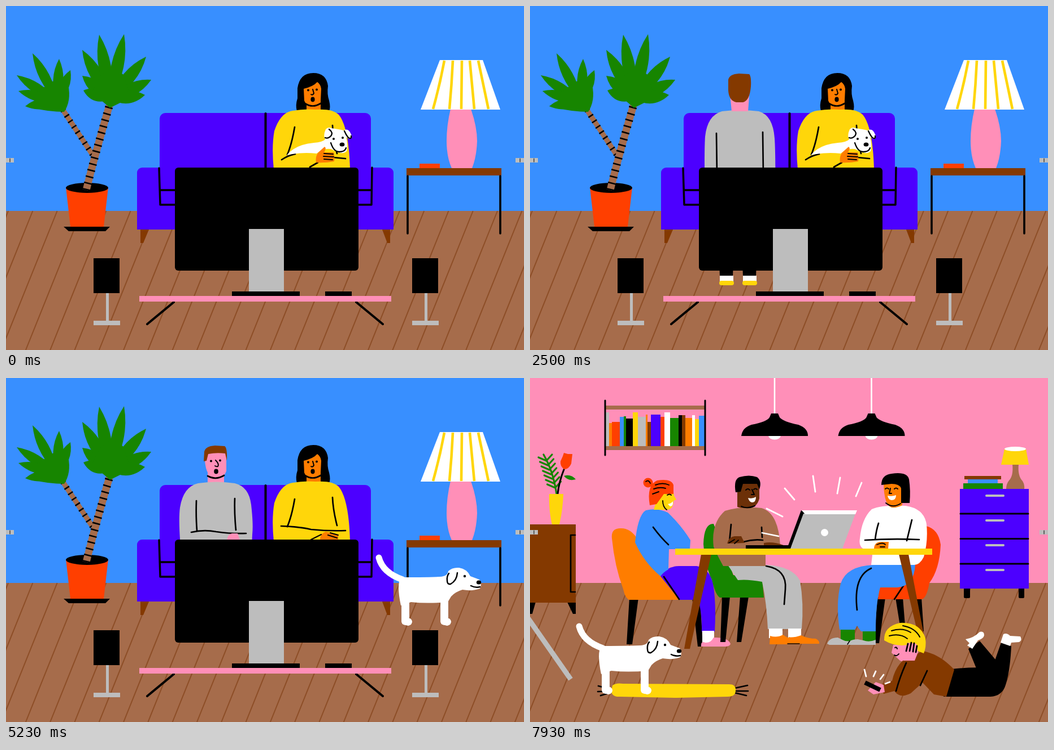
An HTML page for the animation above (8 s loop, 917 px wide and 611 px high).

```html
<!DOCTYPE html>
<html lang="en">
<head>
<meta charset="utf-8">
<title>Two rooms</title>
<style>
html, body { margin: 0; width: 100%; height: 100%; overflow: hidden; }
svg { display: block; width: 100vw; height: 100vh; }
.l { fill: none; stroke: #000; stroke-linecap: round; stroke-linejoin: round; }
.w { fill: none; stroke: #fff; stroke-width: 2.8; stroke-linecap: round; }
.hide { display: none; }
</style>
</head>
<body>
<svg id="stage" viewBox="0 0 917 611" preserveAspectRatio="none"></svg>
<script>
const C = { blue: '#388fff', pink: '#ff8fb8', wood: '#a66c4b', seam: '#8d4e27', brown: '#843900',
  violet: '#4c00ff', gray: '#bdbdbd', red: '#ff3f00', orange: '#ff7d00', yellow: '#ffd60a',
  green: '#178500', dark: '#6c3008', k: '#000', white: '#fff' };

const p = (color, d) => `<path d="${d}" fill="${C[color]}"/>`;
const r = (color, x, y, x2, y2, rad = 0) =>
  `<rect x="${x}" y="${y}" width="${x2 - x}" height="${y2 - y}" rx="${rad}" fill="${C[color]}"/>`;
const o = (color, x, y, rx, ry = rx) => `<ellipse cx="${x}" cy="${y}" rx="${rx}" ry="${ry}" fill="${C[color]}"/>`;
const l = (d, w = 2.7) => `<path class="l" d="${d}" stroke-width="${w}"/>`;
const w = d => `<path class="w" d="${d}"/>`;
const s = (color, d, width, cap = 'butt', dash = '') =>
  `<path d="${d}" fill="none" stroke="${C[color]}" stroke-width="${width}" stroke-linecap="${cap}" stroke-linejoin="round" stroke-dasharray="${dash}"/>`;
const g = (id, ...kids) => `<g id="${id}">${kids.join('')}</g>`;
const at = (x, y, kids) => `<g transform="translate(${x} ${y})">${kids}</g>`;

// a pointed leaf between two points
function leaf(x, y, tx, ty, half) {
  const dx = tx - x, dy = ty - y, n = Math.hypot(dx, dy);
  const mx = x + dx * .52, my = y + dy * .52, ox = -dy / n * half, oy = dx / n * half;
  return p('green', `M${x} ${y}Q${mx + ox} ${my + oy} ${tx} ${ty}Q${mx - ox} ${my - oy} ${x} ${y}Z`);
}
const crown = (x, y, half, tips) => tips.map(t => leaf(x, y, ...t, half)).join('');

function floor() {
  let d = '';
  for (let x = 4; x < 1060; x += 43.3) d += `M${x} 364L${x - 99} 611`;
  return r('wood', 0, 364, 917, 611) + s('seam', d, 2);
}

// ---------- living room ----------
const trunk = (d, width) => s('wood', d, width) + s('k', d, width + 1, 'butt', '2.6 9');
const plant =
  p('red', 'M106 322H181L173 392H114Z') + o('k', 143.5, 323, 37.5, 9) + p('k', 'M102 392H184L176 400H111Z') +
  trunk('M153 264L101 185', 9) + trunk('M142 327Q158 262 183 177', 13) +
  crown(185, 166, 22, [[135, 124], [135, 78], [165, 51], [209, 50], [248, 90], [257, 131], [246, 158], [137, 150]]) +
  p('green', 'M152 153L168 122L188 108L208 122L217 150L206 170L184 181Z') +
  crown(91, 170, 18, [[19, 123], [47, 84], [94, 94], [114, 114], [22, 151], [34, 178]]) +
  p('green', 'M60 150L78 136L96 128L110 140Q116 168 103 188Q75 188 48 181Z');

const sofa =
  r('violet', 272, 190, 646, 390, 10) + r('violet', 232, 287, 686, 380, 9) + r('violet', 232, 320, 686, 397) +
  l('M459.5 191V300', 4) +
  l('M271 288L273 353H300M273 327H300M648 287L647 353H622M647 327H622', 3.5) +
  p('brown', 'M238 397H253L243 421H238ZM666 397H680V421H675Z');

const sideTable =
  p('pink', 'M787 183H823Q834 215 834 240Q833 268 825 288H789Q780 268 780 240Q780 212 787 183Z') +
  p('white', 'M768 96H844L875 184H734Z') +
  s('yellow', 'M776 97Q768 140 756 183M791 97Q789 140 785 183M807 97L806 183M821 97Q825 140 829 183M836 97Q845 140 854 183', 4.6) +
  r('red', 732, 280, 768, 288) + r('brown', 709, 288, 877, 301) + l('M711 302V404M875 302V404', 3.6);

const womanHead =
  p('k', 'M515 187Q512 176 516 164V146Q520 119 544 119Q567 119 570 142Q568 156 572 168Q575 180 572 187Z') +
  r('orange', 532, 168, 557, 190) +
  p('orange', 'M527 147Q544 143 551 135Q557 139 558 147L557 168Q554 178 543 179Q531 178 528 168Z') +
  l('M529 173Q543 182 557 173') + o('k', 535, 149.5, 2) + o('k', 550, 148.5, 2) +
  l('M543 148L545 155Q543 159 540 157', 2) + o('k', 543, 166, 3.6, 4.4);
const woman = womanHead +
  p('yellow', 'M503 187Q525 182 548 184Q578 182 589 193Q607 215 609 290H474Q470 250 475 222Q485 192 503 187Z') +
  l('M511 215Q506 245 498 264M578 212Q579 235 586 262');

const lapDog =
  l('M488 273Q500 265 512 263M538 286L552 278M580 269L601 271') +
  p('white', 'M497 265Q512 246 545 243Q560 242 565 237Q561 230 566 219Q570 214 576 217Q590 219 598 221Q606 216 611 228Q614 236 607 236L602 233Q606 246 603 258Q598 263 588 260L575 254Q562 252 550 262Q522 259 497 265Z') +
  l('M572 219Q580 225 575 231Q570 236 565 234M599 222Q602 229 606 234Q612 237 611 231M575 243Q580 259 590 259Q600 259 602 252', 2.3) +
  o('k', 580, 236, 2) + o('k', 596, 234, 2) + o('k', 595, 246, 4.4, 3.6) +
  p('orange', 'M549 278Q547 266 554 259L564 250Q568 252 563 260L580 260Q582 268 581 276Q565 279 549 278Z') +
  l('M563 262L579 263M562 267L580 268M563 272L578 273', 2);
const crossedArms =
  l('M487 263Q518 264 540 269Q570 272 601 271') +
  p('orange', 'M556 288Q556 276 566 273L588 278V288Z') +
  l('M540 287L558 278M570 279L586 284M574 275L588 279', 2.2);

const shoe = (x, y) => at(x, y, p('yellow', 'M0 0Q28 -3 28 9Q27 14 14 14H-2Z'));
const profile =
  p('pink', 'M182 140L213 137L214 152L218 159Q217 162 213 162Q215 177 205 181V188H179Z') +
  p('brown', 'M177 162Q174 133 181 127Q197 121 212 127Q216 132 213 139L189 140L187 161Z') +
  o('k', 208, 146, 1.9) + l('M192 163Q194 175 203 181M206 169Q210 171 213 168', 2.3);
const walkTop =
  p('gray', 'M178 187Q200 182 209 189Q222 240 219 296H165Q159 230 168 200Q171 190 178 187Z') +
  p('gray', 'M173 280H209L204 333L179 329Z') +
  p('pink', 'M183 330L204 331Q206 350 203 356Q195 360 188 357Z') +
  l('M191 339L193 353M197 338L198 353M170 222L173 294M207 210Q206 250 209 272', 2.2);
const backBody = 'M340 187Q372 183 405 187Q430 194 433 235Q435 265 434 340H310Q308 265 310 232Q314 194 340 187Z';
const frontHead =
  r('pink', 357, 165, 386, 190) + p('pink', 'M352 132H390L390 165Q386 178 372 178Q354 177 352 146Z') +
  p('brown', 'M350 148L351 131Q353 121 370 120L387 121Q392 124 391 147L388 134Q372 132 358 135L355 147Z') +
  l('M357 174Q371 182 386 173') + o('k', 363, 147.5, 2) + o('k', 379, 146.5, 2) +
  l('M371 146Q378 153 375 157Q373 158 370 156', 2);
const foot = x => at(x, 0, p('k', 'M0 430H27L25 480H2Z') + r('white', 2, 479, 26, 490) + r('yellow', 1, 488, 27, 496, 4));

const man = g('man',
  g('walkLegs', p('k', 'M166 294H217Q215 380 209 446L202 482H170Q171 380 166 330Z'), shoe(170, 482), shoe(200, 482)),
  g('strideLegs', s('k', 'M188 300L174 380L164 478M192 300L212 390L226 478', 30), p('k', 'M166 294H217L222 370H170Z'), shoe(152, 480), shoe(224, 482)),
  g('side', walkTop, profile),
  g('back', p('gray', backBody), l('M330 226L331 300M412 224L413 300'),
    g('nape', p('pink', 'M353 146H389L386 187H357Z'),
      p('brown', 'M351 150V131Q353 121 370 120L388 121Q392 125 391 143Q389 168 377 171H365Q352 168 351 150Z')),
    g('turn', at(178, -4, profile))),
  g('front', frontHead, p('gray', 'M340 187Q372 182 405 187Q430 193 434 225Q438 260 436 278L433 340H313Q304 260 308 230Q314 193 340 187Z'),
    l('M337 218Q336 245 338 271M405 214Q404 240 407 270'),
    g('folded', l('M328 274Q350 269 372 273Q400 277 425 276'), p('pink', 'M391 288Q393 277 400 276H410L414 288Z')),
    g('smile', l('M366 165Q372 169 378 164', 2.2)), g('gasp', o('k', 372, 166, 3.8, 4.4))));

const tv =
  r('k', 299, 287, 624, 470, 6) + l('M297 526L250 565M620 526L667 565', 4) + r('gray', 430, 396, 492, 508) +
  r('k', 400, 507, 520, 517) + r('k', 565, 507, 612, 517) + r('pink', 236, 515, 682, 525);
const speaker = x => at(x, 0, r('gray', 22, 509, 27, 561) + r('gray', 0, 559, 47, 567) + r('k', 0, 448, 46, 510));

const room1 = g('room1', r('blue', 0, 0, 917, 364), floor(), plant, sofa, sideTable, woman,
  g('crossed', crossedArms), g('lapDog', lapDog), g('feet', foot(334), foot(375)), man,
  g('dogA'), tv, speaker(155), speaker(719));

// ---------- dining room ----------
const bookList = [[6, 61, 'gray'], [5, 42, 'orange'], [14, 44, 'red'], [7, 53, 'blue'], [4, 54, 'green'], [12, 50, 'k'],
  [9, 61, 'yellow'], [14, 53, 'gray'], [3, 57, 'orange'], [6, 44, 'brown'], [17, 57, 'violet'], [7, 53, 'red'],
  [10, 61, 'white'], [15, 51, 'green'], [6, 56, 'k'], [6, 56, 'brown'], [12, 51, 'orange'], [5, 56, 'white'],
  [7, 49, 'yellow'], [10, 55, 'blue']];
let bx = 134;
const shelf = bookList.map(([n, h, c]) => r(c, bx, 122 - h, bx += n, 122)).join('') +
  r('wood', 133, 49, 310, 56) + r('wood', 133, 121, 310, 128) + l('M133 40V137M310 40V137', 3);

const pendant = x => at(x, 0, s('white', 'M0 0V66', 2.6) + o('white', 0, 102, 11, 7.5) +
  p('k', 'M-9 70L-6 63H6L9 70Q16 78 42 83Q59 89 59 103H-59Q-57 88 -41 83Q-14 78 -9 70Z'));

let fern = 'M47 206Q41 165 24 136';
for (let i = 0; i < 7; i++) {
  const x = 29 + i * 2.6, y = 147 + i * 8;
  fern += `M${x} ${y}l-14 -6M${x} ${y}l10 -11`;
}
const cabinet =
  s('gray', 'M-4 426L72 535', 9) + p('k', 'M66 398H81V419H76ZM0 398H10L4 419H0Z') + r('brown', 0, 260, 81, 399) +
  l('M80 279H72V380H80') + s('green', fern, 3.2, 'round') + l('M49 206Q51 185 61 160', 3) +
  p('red', 'M58 139L60 133L67 135L75 135L73 152Q69 162 60 162Q53 156 54 148Z') +
  p('green', 'M60 174Q72 170 81 180Q68 184 60 174Z') +
  p('yellow', 'M34 206H59Q58 235 52 260H39Q33 235 34 206Z');

const drawers =
  r('k', 768, 372, 779, 391, 2) + r('k', 865, 372, 875, 391, 2) + r('violet', 761, 197, 883, 374) +
  l('M762 241H882M762 285.5H882M762 330H882', 3) +
  [209, 253, 297, 341].map(y => s('gray', `M808 ${y}H838`, 4, 'round')).join('') +
  r('brown', 769, 174, 834, 180) + r('blue', 775, 180, 828, 188) + r('green', 767, 187, 837, 197) +
  p('wood', 'M854 153H865Q863 174 872 183Q876 190 875 197H843Q843 188 848 182Q856 174 854 153Z') +
  p('yellow', 'M840 126H878L883 154H834Z') + o('white', 859, 126, 19, 4);

const guest1 =
  p('k', 'M176 390H192L181 473H171ZM287 390H301L306 477H297Z') +
  p('orange', 'M145 285Q143 267 160 267Q178 266 190 286L240 348L264 385L290 380V394H175Q168 390 165 375Q150 335 145 285Z') +
  p('violet', 'M231 352Q242 334 264 334H295Q318 338 324 365Q330 400 327 451H304Q305 420 298 394H265Z') +
  l('M237 353L264 393') + r('white', 305, 449, 326, 470) +
  p('pink', 'M303 477Q302 466 310 470Q320 471 325 461Q350 460 355 472Q354 477 345 477Z') +
  p('blue', 'M205 235Q225 230 244 239Q268 262 284 288L283 304H246L245 340Q236 345 231 352Q202 328 186 292Q191 243 205 235Z') +
  l('M218 265Q232 284 245 296') +
  g('head1', p('yellow', 'M230 196L254 202L255 209L259 216L254 218Q254 233 243 234H219Z'), o('red', 209, 186, 8.5),
    p('red', 'M212 226Q206 190 225 182Q250 178 254 190V206H237L224 224Z'),
    l('M205 184Q210 180 213 187M222 190Q235 185 246 190M219 197Q230 193 240 196M217 206L228 202M235 218Q235 229 242 234M243 208Q247 205 250 208', 1.9),
    p('white', 'M244 224Q250 223 253 219Q254 228 248 228Z'));

const guest2 =
  p('k', 'M340 388H354L346 469H337ZM372 388H387L374 469H366Z') +
  p('green', 'M325 259Q308 258 307 295Q310 335 322 358Q328 385 336 390H414L411 358L360 350Z') +
  p('gray', 'M350 332H420Q465 335 478 360Q485 400 481 446H421Q419 400 411 362Q385 357 368 359Z') +
  l('M418 334Q455 340 452 375L450 402') + r('white', 423, 445, 447, 462) + r('white', 457, 445, 480, 462) +
  p('orange', 'M456 472L458 460Q466 462 480 457Q492 463 506 463Q513 467 512 472Z') +
  p('orange', 'M424 473L425 458Q437 462 448 456Q458 464 471 464Q478 468 477 473Z') + l('M456 472H477', 1.5) +
  p('wood', 'M345 236Q375 227 410 231Q440 240 443 298L417 302V334H342Q333 318 325 300Q320 258 345 236Z') +
  l('M356 260L353 291M410 265L411 283M378 291Q395 286 412 288') +
  p('dark', 'M349 294Q352 282 362 281H374L380 293ZM414 299V293Q430 290 449 297V300Z') + l('M362 287L352 293M369 288L362 294', 1.8) +
  g('head2', p('dark', 'M367 188H406V214Q402 229 390 231Q374 232 367 229Z'),
    p('k', 'M364 203Q360 180 371 176Q388 171 402 176Q411 183 406 198L402 188H377L373 202Z'),
    l('M382 199Q386 195 389 199M396 198Q399 195 402 198M393 198L397 207L392 207M374 228Q385 233 398 227', 2),
    p('white', 'M386 213Q394 215 400 211Q400 221 393 221Q388 220 386 213Z'));

const guest3 =
  p('k', 'M615 390H629L618 471H609ZM647 390H660L664 440H655ZM682 390H693L697 450H688Z') +
  p('red', 'M701 263Q723 268 727 296Q725 340 707 364Q702 392 693 393H616L620 365L680 330Z') + l('M661 369L645 393') +
  r('green', 550, 445, 575, 468) + r('green', 589, 448, 612, 468) +
  p('gray', 'M562 474Q564 464 580 464L590 466Q600 470 612 465V474ZM526 472Q530 461 545 461L553 465Q562 470 577 465L576 474H530Z') + l('M562 473L566 467', 1.5) +
  p('blue', 'M608 332Q560 334 550 365Q541 400 548 447H575L579 440L586 450H612Q612 400 620 372H650Q680 370 682 331Z') +
  l('M604 338Q572 352 579 412') +
  p('white', 'M605 233Q625 225 665 227Q698 232 702 260Q705 290 697 318Q690 332 680 332H604L607 306Q580 308 584 285Q587 250 605 233Z') +
  l('M617 258Q613 270 611 287M676 252L667 289M593 288Q640 285 689 287') +
  p('orange', 'M609 304Q609 292 620 291H635L634 304Z') + l('M614 296Q625 291 629 296M620 300H628', 1.8) +
  g('head3', p('orange', 'M626 188H660L659 226Q650 231 640 230Q627 226 626 188Z'),
    p('k', 'M622 190Q622 172 640 170Q668 166 671 180Q674 200 672 222H657V196Q654 188 640 188Z'),
    l('M629 197Q632 194 635 197M645 197Q648 194 651 197M638 196L636 205H640M630 222Q642 232 656 223', 2),
    p('white', 'M633 209Q641 211 648 208Q648 217 640 217Q634 216 633 209Z'));

const laptop = r('k', 382, 297, 462, 303) + p('k', 'M480 235L488 240L464 303H455Z') +
  p('gray', 'M484 241H576L553 303H461Z') + p('white', 'M481 235H579L576 242H487Z') + o('white', 521.5, 274.5, 6.5) +
  g('raysA', w('M451 196L468 216M501 174L505 202M549 177L544 205M587 186L577 210M419 232L447 246M411 275L440 281'));

const table = p('brown', 'M303 313H321L283 481H273ZM653 313H670L698 460H688Z') + r('yellow', 257, 303, 712, 314);

const kid =
  g('kick', p('k', 'M776 481L796 467L834 512L826 552L800 540Z'),
    p('white', 'M771 464Q785 462 796 451Q804 449 804 457Q803 463 793 466L783 481L774 475L778 471Z')) +
  p('k', 'M746 517Q790 512 818 516L834 470L852 476Q850 520 842 545Q836 565 815 566H732Z') +
  l('M788 478L822 516', 1) +
  p('white', 'M833 470L838 455Q844 452 850 458L868 459Q872 466 866 469L852 470L850 476Z') +
  p('pink', 'M643 474L684 468V502Q664 506 655 502L640 488Z') +
  p('brown', 'M695 485Q725 490 751 518L737 566L715 562L695 541L674 560Q655 570 645 556L626 561L620 545L641 538Q646 515 660 502Z') +
  l('M703 520L691 546M666 506Q655 530 648 556') +
  p('yellow', 'M627 466Q626 441 655 435Q690 433 700 462Q702 478 697 489L684 484L678 472Q650 480 627 466Z') +
  l('M640 449Q660 443 674 452M636 458Q655 453 668 463M660 440Q682 444 690 460M646 479Q649 477 650 481M645 492Q649 495 653 490', 2) +
  p('pink', 'M661 502Q663 482 668 470L684 472L687 487L681 502Z') +
  l('M666 485L669 472M672 485L675 470M678 486L680 471M683 487L685 476', 2.8) +
  p('pink', 'M598 555L612 540L626 545L628 558L608 562Z') + s('k', 'M593 541L620 554', 8) +
  g('raysB', w('M592 518L595 530M612 521L608 530M626 527L620 535M637 540L629 543'));

const rug = l('M121 547L144 553M120 557L144 556M125 564L145 558M362 551L385 546M362 556H386M362 559L383 564') +
  p('yellow', 'M146 546Q152 541 165 543L350 544Q365 543 364 555Q364 566 350 566L260 568L160 566Q144 567 144 555Z');

const room2 = g('room2', r('pink', 0, 0, 917, 364), floor(), shelf, pendant(433), pendant(604.5), cabinet, drawers,
  guest1, guest2, guest3, laptop, table, kid, rug, g('dogB'));

const handles = r('gray', 0, 270, 14, 278) + r('gray', 902, 270, 917, 278) + l('M7 271V277M910 271V277', 1);

document.getElementById('stage').innerHTML = room1 + room2 + handles + g('door');

// ---------- motion ----------
const $ = id => document.getElementById(id);
const show = (id, on) => $(id).classList.toggle('hide', !on);
const move = (id, x, y, extra = '') => $(id).setAttribute('transform', `translate(${x} ${y}) ${extra}`);
const step = (rows, t) => rows.filter(row => row[0] <= t).pop();
function ease(rows, t) {
  const i = rows.findIndex(row => row[0] > t);
  if (i < 0) return rows[rows.length - 1].slice(1);
  const a = rows[Math.max(0, i - 1)], b = rows[i], k = i ? (t - a[0]) / (b[0] - a[0]) : 0;
  return a.slice(1).map((v, n) => v + (b[n + 1] - v) * k);
}

const doorSteps = [[0, 0], [170, 80], [270, 170], [1100, 130], [1200, 77], [1300, 0]];
const manSteps = [[0, 'none', 0, 0], [900, 'stride', -56, 0], [1100, 'stride', -26, 0], [1200, 'walk', 0, 0],
  [1300, 'stride', 36, 0], [1500, 'walk', 62, 0], [1600, 'stride', 84, 0], [1700, 'walk', 106, 0],
  [1900, 'stride', 134, 0], [2100, 'walk', 156, 0], [2200, 'stride', 170, 0], [2300, 'walk', 179, 0],
  [2500, 'back', 0, 0], [2700, 'back', 0, -10], [2900, 'back', 0, -21], [3100, 'back', 0, -35], [3300, 'back', 0, -44],
  [3500, 'turn', 0, -44], [3600, 'stand', 0, -44], [3900, 'sit', 0, -18], [3930, 'sit', 0, 0], [4370, 'gasp', 0, 0]];
const dogPath = [[5030, -150, -130], [5130, -70, -75], [5230, 0, 0], [5330, 0, 0], [6230, 57, 94], [6630, 104, 126],
  [7030, 174, 122], [7830, 344, 122]];
const CUT = 6830;

// foot shifts: rear near, rear far, front near, front far
const gaits = [[0, -30, -10, 30], [8, -14, 4, 8], [-30, 0, 26, -14], [-12, 8, 8, 4]];
function dog(f) {
  const leg = (x, dx) => {
    const end = 432 - Math.abs(dx) * .24;
    return s('white', `M${x} 385L${x + dx * .45} ${(385 + end) / 2}L${x + dx} ${end}l5 1`, 13.5, 'round');
  };
  return s('white', 'M660 319Q667 346 702 358', 11, 'round') +
    leg(707, f[1]) + leg(776, f[3]) + leg(707, f[0]) + leg(776, f[2]) +
    p('white', 'M692 354Q740 354 768 353Q782 352 783 343Q790 336 802 337Q816 339 822 352L838 358Q843 366 839 374Q826 379 808 376Q795 380 788 388L782 398Q745 401 717 398L699 404Q693 375 696 362Z') +
    (f[1] ? l('M692 371Q692 390 695 406M763 395Q768 397 772 404', 2) : '') +
    l('M799 346Q798 360 787 366Q781 367 781 360Q780 352 784 347M823 369Q831 373 839 371', 2.5) +
    o('k', 812, 352, 2.2) + o('k', 837, 363, 4.2, 3.6);
}

function draw(t) {
  const second = t >= CUT;
  show('room1', !second);
  show('room2', second);

  const open = step(doorSteps, t)[1], k = open - 77, hx = open - 11;
  $('door').innerHTML = open && !second ? p('brown', `M0 95L${open} ${110 - k * .12}V${482 + k * .25}L0 516Z`) +
    r('gray', hx - 3, 256, hx + 4, 310, 3) + r('gray', hx - 16, 270, hx + 4, 277) + l(`M${hx - 9} 271V276`, 1) : '';

  const [, pose, mx, my] = step(manSteps, t);
  const side = pose === 'walk' || pose === 'stride', back = pose === 'back' || pose === 'turn';
  show('walkLegs', pose === 'walk');
  show('strideLegs', pose === 'stride');
  show('side', side);
  show('back', back);
  show('nape', pose === 'back');
  show('turn', pose === 'turn');
  show('front', !side && !back && pose !== 'none');
  show('folded', pose === 'sit' || pose === 'gasp');
  show('smile', pose !== 'gasp');
  show('gasp', pose === 'gasp');
  move('man', mx, my);
  show('feet', t >= 2500 && t < 3100);
  move('feet', 0, t >= 2900 ? -10 : 0);

  const free = t >= 5030;
  show('lapDog', !free);
  show('crossed', free);
  const tick = Math.floor((t - 30) / 100), dt = tick * 100 + 30;
  const [x, y] = ease(dogPath, dt);
  const still = dt < 5430 || dt >= 7830;
  const body = dog(still ? [0, 0, 0, 0] : gaits[(tick - 66 + 400) % 4]);
  $('dogA').innerHTML = free && !second ? body : '';
  $('dogB').innerHTML = second ? body : '';
  move('dogA', x, y, dt < 5230 ? 'rotate(12 750 380)' : '');
  move('dogB', x - 917, y);

  const beat = Math.floor((79 - tick) / 2) % 2;
  ['head1', 'head2', 'head3'].forEach(id => move(id, 0, beat ? -2 : 0));
  show('raysA', !beat);
  show('raysB', !beat);
  move('kick', 0, 0, `rotate(${beat ? 5 : 0} 832 540)`);
}

const start = performance.now();
function frame(now) {
  draw(Math.max(0, now - start) % 8000);
  requestAnimationFrame(frame);
}
draw(0);
requestAnimationFrame(frame);
</script>
</body>
</html>
```
